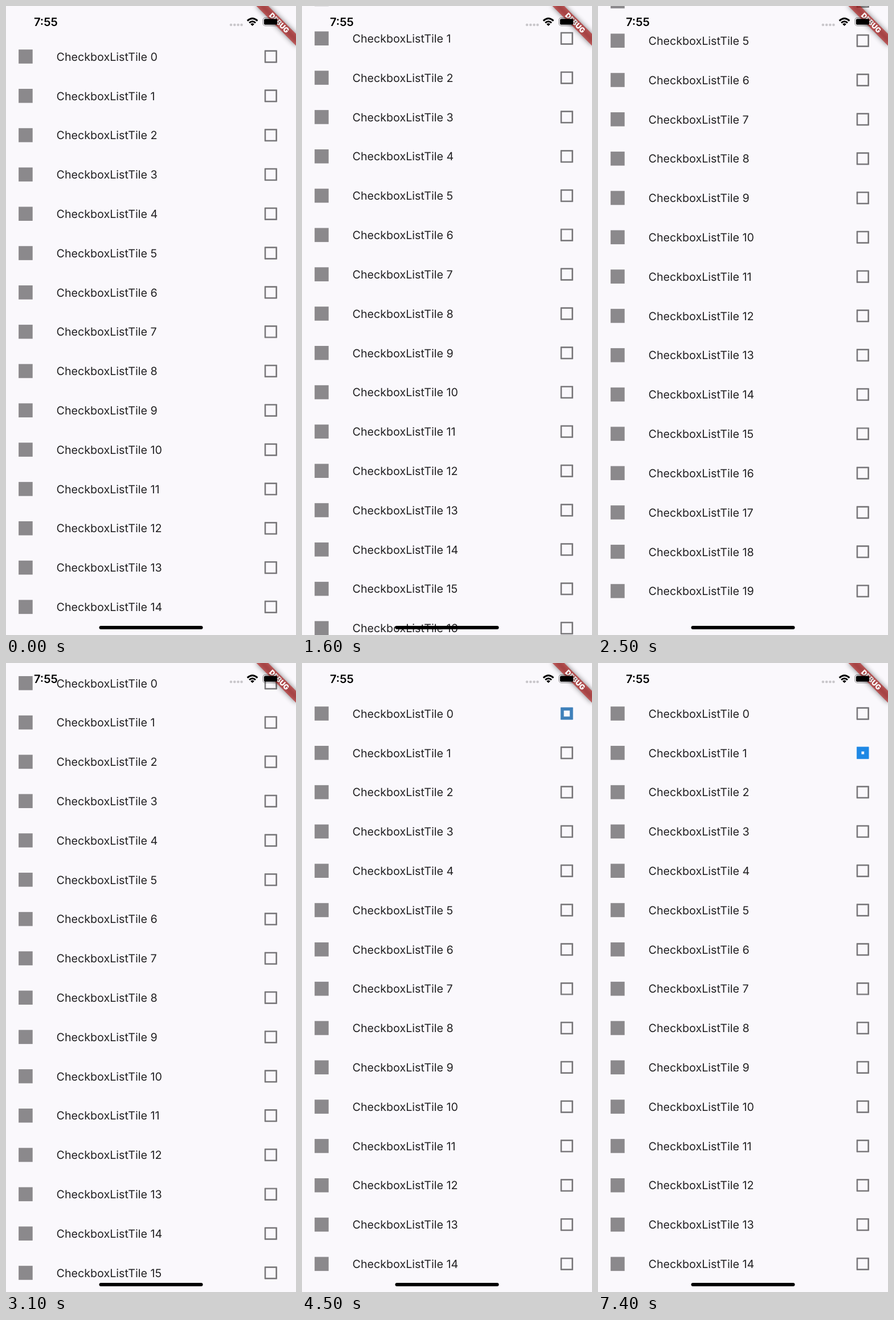
Recreate the animation shown at these times as an HTML page. Size 509 by 1101 pixels, loop 7.5 s.

```html
<!DOCTYPE html>
<html lang="en">
<head>
<meta charset="utf-8">
<title>Checkbox list</title>
<style>
  html, body { margin: 0; width: 100%; height: 100%; overflow: hidden; background: #faf8fc; }
  svg { display: block; width: 509px; height: 1101px; }
  text { font-family: Inter, Roboto, sans-serif; text-rendering: geometricPrecision; }
</style>
</head>
<body>
<svg viewBox="0 0 509 1101" xmlns="http://www.w3.org/2000/svg">
  <defs>
    <filter id="blur" x="-30%" y="-150%" width="160%" height="400%">
      <feGaussianBlur stdDeviation="3.96"/>
    </filter>
  </defs>
  <rect width="509" height="1101" fill="#faf8fc"/>
  <g transform="scale(1.2295 1.2288)"><g id="list"></g></g>

  <g transform="translate(509 0) scale(1.2295 1.2288) rotate(45)">
    <rect x="-40" y="28" width="80" height="12" fill="#000" fill-opacity=".5" filter="url(#blur)"/>
    <rect x="-40" y="28" width="80" height="12" fill="#b71c1c" fill-opacity=".627"/>
    <text x="0" y="37.6" font-size="10.2" font-weight="900" text-anchor="middle" fill="#fff">DEBUG</text>
  </g>

  <text x="49" y="35.2" font-size="20" font-weight="600" fill="#000">7:55</text>
  <g fill="#c9c7cb">
    <circle cx="394.9" cy="33" r="2.3"/>
    <circle cx="401.2" cy="33" r="2.3"/>
    <circle cx="407.4" cy="33" r="2.3"/>
    <circle cx="413.5" cy="33" r="2.3"/>
  </g>
  <g fill="none" stroke="#000" stroke-width="2.9">
    <path d="M423.6 25.9Q432.5 17.7 441.4 25.9"/>
    <path d="M427 29.5Q432.5 24.7 438 29.5"/>
    <path d="M429.2 31.7Q432.5 29 435.8 31.7L432.5 35Z" fill="#000" stroke="none"/>
  </g>
  <rect x="450.9" y="20.6" width="27.6" height="14" rx="4.2" fill="none" stroke="#000" stroke-opacity=".38" stroke-width="1.2"/>
  <rect x="452.8" y="22.4" width="23.4" height="10.4" rx="2.6"/>
  <path d="M480 25.3Q482.2 26.2 482.2 27.6Q482.2 29 480 29.9Z" fill-opacity=".4"/>
  <rect x="163.5" y="1085" width="182" height="6.1" rx="3.05"/>
</svg>
<script>
const NS = 'http://www.w3.org/2000/svg';
const LOOP = 7500, STEP = 100;
const ROWS = 20, ROW_H = 56, TOP = 72;
const ICON = 20, ICON_X = 28;
const BOX = 18, STROKE = 2, BOX_X = 378;
const GREY = [115, 114, 117], BLUE = [30, 136, 229];

// Scroll positions: time in ms, offset in points
const SCROLL = [
  [1100, 0], [1200, 4], [1400, 30], [1600, 81.8], [1700, 167], [1800, 233],
  [1900, 278], [2000, 302], [2100, 313], [2200, 312], [2300, 307], [2500, 302.6],
  [2600, 302], [2700, 298], [2800, 268], [2900, 208], [3000, 115], [3100, 43.3],
  [3200, 0], [3300, -12], [3400, -8], [3500, -3.5], [3600, -1.7], [3800, 0]
];

// Toggles: row, start and length of the check, start and length of the uncheck
const TOGGLES = [
  { row: 0, on: 4450, onLen: 300, off: 5130, offLen: 240 },
  { row: 1, on: 6430, onLen: 240, off: 7220, offLen: 235 }
];

const clamp = v => Math.max(0, Math.min(1, v));
const smooth = v => { v = clamp(v); return v * v * (3 - 2 * v); };
const mix = (a, b, k) => a + (b - a) * k;

function add(parent, tag, attrs) {
  const el = document.createElementNS(NS, tag);
  for (const key in attrs) el.setAttribute(key, attrs[key]);
  parent.appendChild(el);
  return el;
}

function square(half, y) {
  return `M${BOX_X - half} ${y - half}h${2 * half}v${2 * half}h${-2 * half}Z`;
}

const list = document.getElementById('list');
const boxes = [];
for (let i = 0; i < ROWS; i++) {
  const y = TOP + i * ROW_H;
  add(list, 'rect', { x: ICON_X - ICON / 2, y: y - ICON / 2, width: ICON, height: ICON, fill: '#8b898c' });
  add(list, 'text', { x: 72, y: y + 5.9, 'font-size': 16, fill: '#212022' })
    .textContent = 'CheckboxListTile ' + i;
  const frame = add(list, 'path', { 'fill-rule': 'evenodd', 'stroke-width': .6, 'stroke-linejoin': 'round' });
  const tick = add(list, 'path', { fill: 'none', stroke: '#fff', 'stroke-width': STROKE });
  boxes.push({ y, frame, tick });
  drawBox(boxes[i], 0);
}

// The border closes inwards first, then the tick is drawn
function drawBox({ y, frame, tick }, p) {
  const half = (BOX - (1 - Math.abs(p - .5) * 2) * STROKE) / 2;
  const hole = half - STROKE - 2 * half * p * 2;
  const k = clamp(p / .12);
  const color = `rgb(${GREY.map((c, i) => Math.round(mix(c, BLUE[i], k)))})`;
  frame.setAttribute('d', square(half - .3, y) + (hole > 0 ? square(hole + .3, y) : ''));
  frame.setAttribute('fill', color);
  frame.setAttribute('stroke', color);

  const at = (u, v) => `${BOX_X + (u - .5) * BOX} ${y + (v - .5) * BOX}`;
  const t = (p - .5) * 2;
  let d = '';
  if (t > 0) {
    const a = clamp(t * 2), b = clamp(t * 2 - 1);
    d = `M${at(.15, .45)}L${at(mix(.15, .4, a), mix(.45, .7, a))}`;
    if (b > 0) d += `L${at(mix(.4, .85, b), mix(.7, .25, b))}`;
  }
  tick.setAttribute('d', d);
}

function offsetAt(t) {
  for (let i = 1; i < SCROLL.length; i++) {
    const [t0, a] = SCROLL[i - 1], [t1, b] = SCROLL[i];
    if (t <= t1) return mix(a, b, clamp((t - t0) / (t1 - t0)));
  }
  return 0;
}

function render(ms) {
  const t = Math.floor((ms % LOOP) / STEP) * STEP;
  list.setAttribute('transform', `translate(0 ${-offsetAt(t)})`);
  for (const { row, on, onLen, off, offLen } of TOGGLES) {
    drawBox(boxes[row], smooth((t - on) / onLen) - smooth((t - off) / offLen));
  }
}

const start = performance.now();
function tickFrame() {
  render(performance.now() - start);
  requestAnimationFrame(tickFrame);
}
tickFrame();
</script>
</body>
</html>
```
